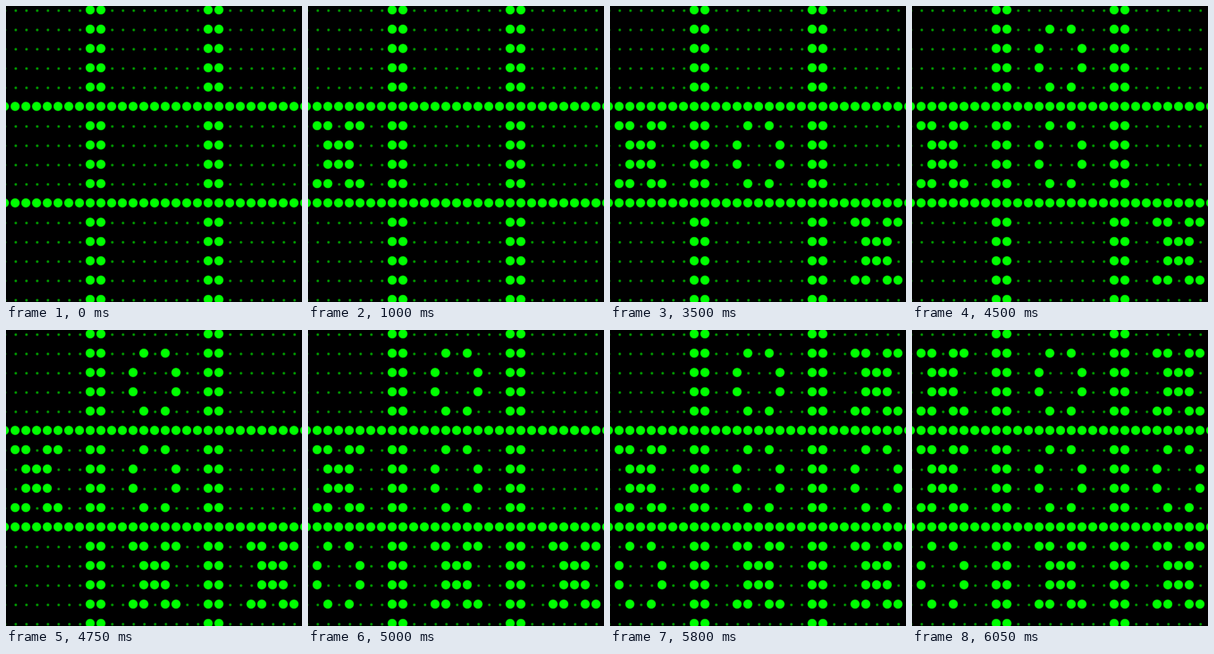
An HTML page with a canvas that plays this animation: 450 px wide and 450 px high, repeating every 7.05 s.

```html
<!DOCTYPE html>
<html lang="en">
<head>
<meta charset="utf-8">
<title>Dot grid game</title>
<style>
  html, body { margin: 0; width: 100%; height: 100%; overflow: hidden; background: #000; }
  canvas { display: block; width: 450px; height: 450px; }
</style>
</head>
<body>
<canvas id="board" width="450" height="450"></canvas>
<script>
const ctx = document.getElementById('board').getContext('2d');
const LOOP = 7050;
const SCALE = 450 / 276;
const GLYPHS = {
  X: ['##.##', '.###.', '.###.', '##.##'],
  O: ['.#.#.', '#...#', '#...#', '.#.#.']
};
// time, mark, board column, board row
const MOVES = [
  [1000, 'X', 0, 1], [1500, 'O', 1, 1], [3500, 'X', 2, 2],
  [4500, 'O', 1, 0], [4750, 'X', 1, 2], [5000, 'O', 0, 2],
  [5400, 'X', 2, 0], [5800, 'O', 2, 1], [6050, 'X', 0, 0]
];

function softDot(rgb, core, edge) {
  const g = ctx.createRadialGradient(0, 0, core, 0, 0, edge);
  g.addColorStop(0, `rgba(${rgb},1)`);
  g.addColorStop(1, `rgba(${rgb},0)`);
  return { fill: g, edge };
}
const big = softDot('0,255,0', 6, 7.7);
const small = softDot('0,165,0', 0.9, 2.8);

function stamp(dot, x, y) {
  ctx.setTransform(1, 0, 0, 1, x, y);
  ctx.fillStyle = dot.fill;
  ctx.fillRect(-dot.edge, -dot.edge, 2 * dot.edge, 2 * dot.edge);
}

const isLine = (col, row) => row % 5 === 0 && row > 0 && row < 15 || col % 11 === 7 || col % 11 === 8;

function isMarked(col, row, count) {
  return MOVES.slice(0, count).some(([, mark, bx, by]) => {
    const line = GLYPHS[mark][row - 1 - by * 5];
    return line && line[col - bx * 11] === '#';
  });
}

function draw(count) {
  ctx.setTransform(1, 0, 0, 1, 0, 0);
  ctx.fillStyle = '#000';
  ctx.fillRect(0, 0, 450, 450);
  for (let row = 0; row < 16; row++) {
    for (let col = -1; col < 28; col++) {
      const x = (8.5 + 10 * col) * SCALE;
      const y = (3.6 + 18 * row) * SCALE;
      if (isLine(col, row) || isMarked(col, row, count)) stamp(big, x, y);
      else stamp(small, x + 1, y + 1.2);
    }
  }
}

let shown = -1;
function tick() {
  const t = performance.now() % LOOP;
  const count = MOVES.filter(m => m[0] <= t).length;
  if (count !== shown) draw(shown = count);
  requestAnimationFrame(tick);
}
tick();
</script>
</body>
</html>
```
